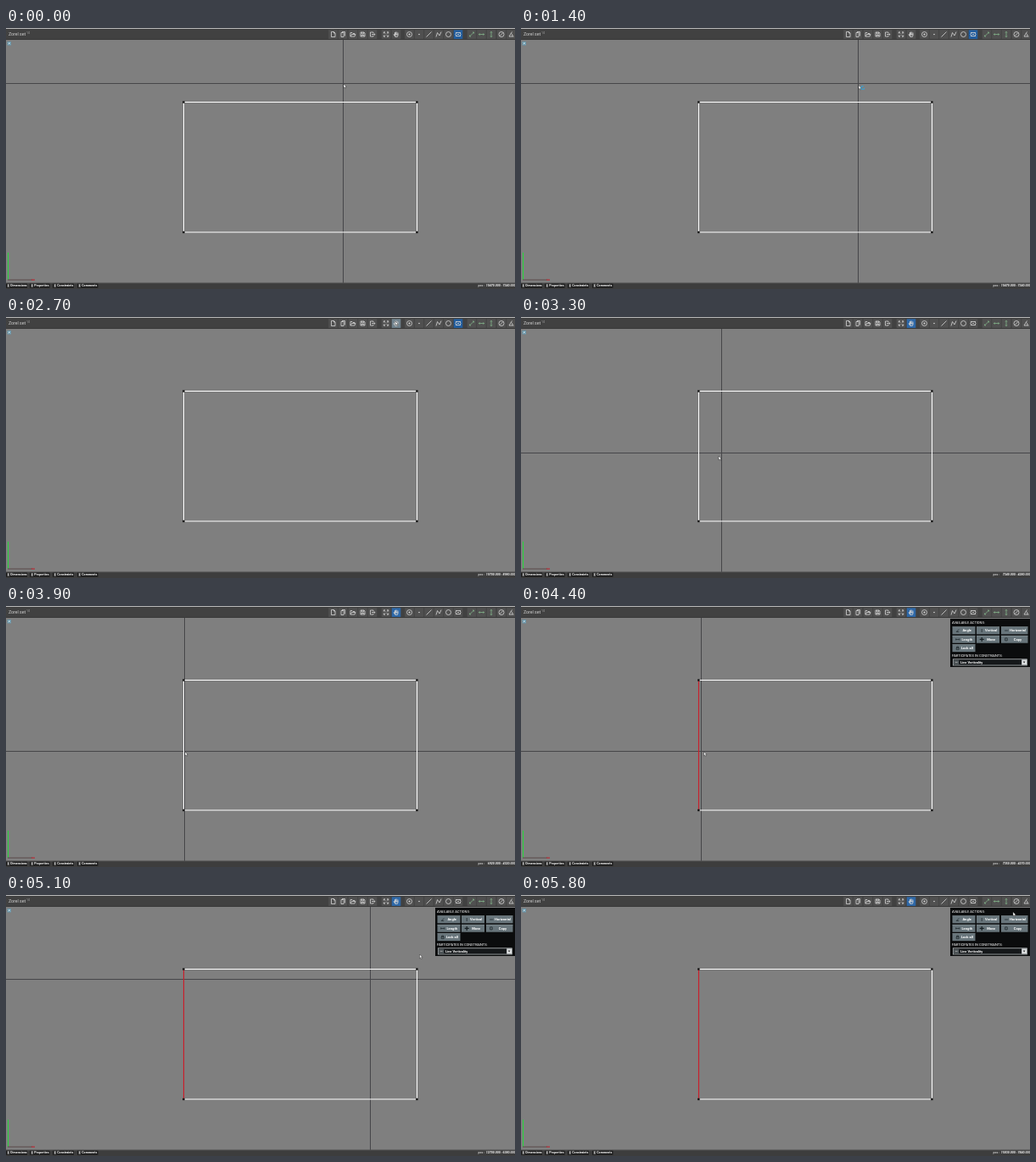
An HTML page for the animation above (6.1 s loop, 600x308 px).

```html
<!DOCTYPE html>
<html lang="en">
<head>
<meta charset="utf-8">
<title>Sketch editor</title>
<style>
  html, body { margin: 0; width: 100%; height: 100%; overflow: hidden; background: #7f7f7f; }
  svg { display: block; width: 100vw; height: 100vh; }
  text { font-family: Roboto, "Liberation Sans", sans-serif; fill: #fff; white-space: pre; }
  .icon { fill: none; stroke: #d6d6d6; stroke-width: .8; }
  .green { stroke: #83b58b; }
  .bold { font-weight: 700; }
  .cross { stroke: #464649; stroke-width: 1; shape-rendering: crispEdges; }
</style>
</head>
<body>
<svg id="stage" viewBox="0 0 600 308">
  <rect width="600" height="308" fill="#7f7f7f"/>
  <g id="cross">
    <path id="crossV" class="cross" d="M.5 14V301"/>
    <path id="crossH" class="cross" d="M0 .5H600"/>
  </g>

  <rect x="209.5" y="87.5" width="275" height="153.5" fill="none" stroke="#fff"/>
  <path id="selected" d="M209.5 88V241" stroke="#c8202c" stroke-width="1.2"/>
  <g id="corners" fill="#111"></g>

  <path d="M2.5 265V297" stroke="#25d83a"/>
  <path d="M2 297.2H31" stroke="#513b3b" stroke-width=".8"/>
  <path d="M30 297.2H34" stroke="#b52b35" stroke-width="1.2"/>
  <rect x="1.5" y="16" width="4.5" height="4.5" fill="#6794a8"/>
  <path d="M2.6 17.1l2.3 2.3m0-2.3l-2.3 2.3" stroke="#e4f1f5" stroke-width=".7"/>

  <rect width="600" height="14" fill="#414141"/>
  <rect width="600" height="1" fill="#b9b9b9"/>
  <rect y="13" width="600" height="1" fill="#393939"/>
  <text x="3" y="8.5" font-size="5.2" style="fill:#d2d2d2">Zorel set</text>
  <text x="24.3" y="6.5" font-size="2.7" style="fill:#bbb">1.0</text>
  <g id="tools"></g>

  <rect y="301" width="600" height="7" fill="#3d3d3d"/>
  <rect y="300.5" width="600" height="1" fill="#505050"/>
  <g id="tabs"></g>
  <text class="bold" x="556.5" y="305.4" font-size="3.5" style="fill:#ccc">pos :</text>
  <text id="status" class="bold" x="600.5" y="305.4" font-size="3.6" font-style="italic" text-anchor="end"></text>

  <g id="panel">
    <rect x="506" y="15" width="94" height="57" fill="#0b0c0d"/>
    <text x="508" y="21.2" font-size="4" textLength="">AVAILABLE ACTIONS:</text>
    <g id="actions"></g>
    <text x="508" y="59.8" font-size="4">PARTICIPATES IN CONSTRAINTS:</text>
    <rect x="509.3" y="62.8" width="87.2" height="7.2" fill="#15181a" stroke="#c9cfd1" stroke-width=".7"/>
    <rect x="510" y="63.5" width="6.3" height="5.8" fill="#4c5356"/>
    <path d="M511.8 66.4h2.8" stroke="#bbb" stroke-width=".7"/>
    <text class="bold" x="518" y="67.7" font-size="3.9">Line Verticality</text>
    <rect x="590.2" y="63.3" width="5.8" height="6.2" fill="#e0e3e4"/>
    <path d="M591.7 65.6h2.8l-1.4 2z" fill="#333"/>
  </g>

  <g id="cursor">
    <path d="M0 0V4.8L1.1 3.8L1.9 5.5L2.8 5.1L2 3.4H3.4Z" fill="#fff" stroke="#333" stroke-width=".5"/>
    <circle id="busy" cx="4.8" cy="3" r="1.9" fill="none" stroke="#3f9cc9" stroke-width="1.2" stroke-dasharray="9 3"/>
  </g>
</svg>
<script>
const LOOP = 6100, STEP = 100;
const $ = id => document.getElementById(id);

// Icon paths are drawn around the centre of an 11px button.
const page = 'M-2-3H1L2.5-1.5V3H-2Z';
const tools = [
  [385.5, page + 'M1-3V-1.5H2.5'],
  [397, 'M-2-2H1V3H-2ZM-1-3H2.5V2'],
  [409, 'M-3 2.5V-2H-1L0-1H2V0M-3 2.5L-1.5 0H3L2 2.5Z'],
  [420.5, 'M-2.5-2.5H1.5L2.5-1.5V2.5H-2.5ZM-1-2.5V-.5H1V-2.5M-1.5 2.5V1H1.5V2.5'],
  [432, 'M1-1.5V-2.5H-2.5V2.5H1V1.5M-1 0H3M1.8-1.2L3 0L1.8 1.2'],
  [448, 'M-2.7-1V-2.7H-1M1-2.7H2.7V-1M2.7 1V2.7H1M-1 2.7H-2.7V1M-2.5-2.5L-.8-.8M2.5-2.5L.8-.8M2.5 2.5L.8.8M-2.5 2.5L-.8.8'],
  [460, 'M-1 3L-3 .2L-1.5.6V-2M-1.5.5V-2.3M-.4.5V-3M.8.5V-2.8M2 .5V-2M-1.4.4H2.2L1.5 2.8H-1Z', 'hand'],
  [475.5, 'M-3 0A3 3 0 1 1 3 0A3 3 0 1 1-3 0M-1.2 0H1.2M0-1.2V1.2'],
  [487, 'M-.7 0H.7M0-.7V.7'],
  [498.5, 'M-3 3L3-3'],
  [510, 'M-3 3L-1.5-2L1 1.5L3-3'],
  [521.5, 'M-3 0A3 3 0 1 1 3 0A3 3 0 1 1-3 0'],
  [533, 'M-2-2H2L3 0L2 2H-2L-3 0ZM-3-2H-2M3-2H2M-3 2H-2M3 2H2M-1 0H1', 'polygon'],
  [549, 'M-2.5 2.5L2.5-2.5M-2.5 1V2.5H-1M1-2.5H2.5V-1', '', 'green'],
  [560.5, 'M-3.2 0H3.2M-2-1L-3.2 0L-2 1M2-1L3.2 0L2 1', '', 'green'],
  [572, 'M0-3.2V3.2M-1-2L0-3.2L1-2M-1 2L0 3.2L1 2', '', 'green'],
  [584, 'M-3 0A3 3 0 1 1 3 0A3 3 0 1 1-3 0M-2 2L2-2'],
  [595.5, 'M-2.5 2.5L1-3M-2.5 2.5H3M0-1.2Q1.8 0 1.7 2.5']
];
$('tools').innerHTML = tools.map(([x, d, id, tone = '']) => `
  <g transform="translate(${x} 7.5)">
    <rect ${id ? `id="${id}"` : ''} x="-5.3" y="-5.2" width="10.6" height="10.6" fill="#505050"/>
    <path class="icon ${tone}" d="${d}"/>
  </g>`).join('');

$('corners').innerHTML = [209, 484].flatMap(x => [87.5, 241].map(y =>
  `<rect x="${x - .8}" y="${y - 1.2}" width="2.4" height="2.4"/>`)).join('');

const tabs = [[0, 25, 'Dimensions'], [28, 23.5, 'Properties'], [55, 25, 'Constraints'], [84, 24.5, 'Comments']];
$('tabs').innerHTML = tabs.map(([x, w, label]) => `
  <rect x="${x}" y="301.7" width="${w}" height="5" fill="#1c1c1c"/>
  <path class="icon" d="M${x + 1.5} 303H${x + 4}M${x + 1.5} 305H${x + 4}M${x + 2.7} 302.7V305.3"/>
  <text class="bold" x="${x + 5.2}" y="305.4" font-size="3.7">${label}</text>`).join('');

const columns = [[508.5, 27], [537, 27], [566, 31.5]];
const actions = [['Angle', 'Vertical', 'Horizontal'], ['Length', 'Move', 'Copy'], ['Lock all']];
const marks = ['M-1.5 1.5L1.5-1.5M-1.5 1.5H1.5', 'M0-2V2', 'M-2 0H2',
  'M-2 0H2M-2-1V1M2-1V1', 'M-2.5 0H2.5M0-2.5V2.5', 'M-1.5-1.5H1V1.5H-1.5Z', 'M-1.5-.3H1.5V1.8H-1.5ZM-1-.3V-1.8H1V-.3'];
$('actions').innerHTML = actions.map((row, r) => row.map((label, c) => {
  const [x, w] = columns[c], y = 24.5 + r * 10.4, strong = label === 'Move';
  return `<rect x="${x}" y="${y}" width="${w}" height="8.8" fill="#68757b"/>
    <rect x="${x}" y="${y}" width="${w}" height=".6" fill="#8b979c"/>
    <path class="icon" style="stroke:#182023;stroke-width:${strong ? 1.2 : .7}"
      transform="translate(${x + 6.2} ${y + 4.5})" d="${marks[r * 3 + c]}"/>
    <text class="bold" x="${x + (w + 9.5) / 2 - 1}" y="${y + 5.9}" font-size="4.1" text-anchor="middle">${label}</text>`;
}).join('')).join('');

// time, x, y
const pointer = [
  [0, 398, 66], [1800, 398, 66], [2100, 403, 48], [2400, 445, 12], [2600, 459, 5], [2800, 459, 5],
  [3000, 370, 78], [3200, 237, 161], [3300, 233, 164], [3600, 219, 170], [3800, 211, 172],
  [4200, 211, 172], [4600, 220, 172], [4700, 220, 172], [4800, 255, 160], [5000, 430, 100],
  [5200, 545, 40], [5400, 564, 19], [5800, 580, 20], [LOOP, 580, 20]
];
// time, model x, model y
const readout = [
  [0, 10470, 7340], [1800, 10470, 7340], [2400, 10700, 8980], [2800, 10700, 8980],
  [3300, 7340, 4280], [3900, 6920, 4320], [4200, 6920, 4320], [4700, 8000, 4200],
  [4800, 8000, 4200], [5300, 15830, 7840], [LOOP, 15830, 7840]
];

function sample(keys, t) {
  const i = Math.max(1, keys.findIndex(k => k[0] >= t));
  const [t0, x0, y0] = keys[i - 1], [t1, x1, y1] = keys[i];
  const p = (t - t0) / (t1 - t0);
  return [x0 + (x1 - x0) * p, y0 + (y1 - y0) * p];
}
const show = (id, on) => $(id).setAttribute('visibility', on ? 'visible' : 'hidden');
const move = (id, x, y) => $(id).setAttribute('transform', `translate(${x} ${y})`);

function render(t) {
  const [x, y] = sample(pointer, t);
  const [cx, cy] = sample(pointer, Math.max(0, t - STEP));
  const panelOpen = t >= 4300, busy = t >= 1400 && t < 1600;
  const overCanvas = y > 14 && cy > 14 && !(panelOpen && cx > 506 && cy < 72);

  move('cursor', x, y + (busy ? 1.5 : 0));
  move('crossV', Math.round(cx - 1), 0);
  move('crossH', 0, Math.round(cy - 1));
  show('cross', overCanvas);
  show('busy', busy);
  show('selected', t >= 4000);
  show('panel', panelOpen);

  const hover = t >= 2500 && t < 2800;
  $('hand').setAttribute('fill', t >= 2800 ? '#2e68a8' : hover ? '#71838e' : '#505050');
  $('polygon').setAttribute('fill', t < 2800 ? '#245f9f' : '#505050');
  $('status').textContent = sample(readout, t)
    .map(v => (Math.round(v / 10) * 10).toFixed(3)).join(' : ');
}

const start = performance.now();
function tick() {
  const t = (performance.now() - start) % LOOP;
  render(Math.floor(t / STEP) * STEP);
  requestAnimationFrame(tick);
}
tick();
</script>
</body>
</html>
```
